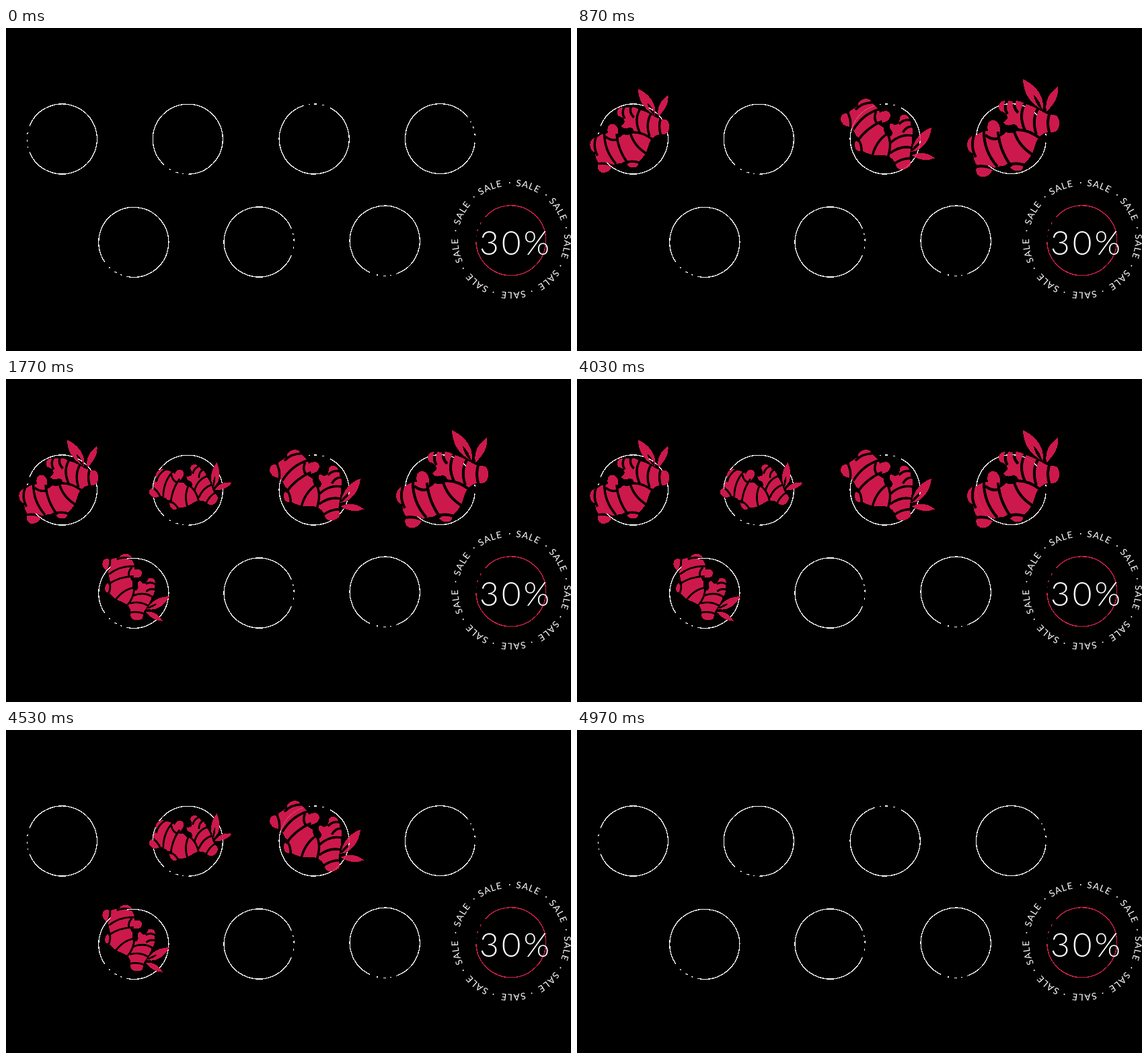
Write an HTML page that moves like this. It is 840x480 px and loops after 5010 ms.

```html
<!DOCTYPE html>
<html lang="en">
<head>
<meta charset="utf-8">
<title>Sale</title>
<style>
  html, body { margin: 0; width: 100%; height: 100%; overflow: hidden; background: #000; }
  svg { display: block; width: 840px; height: 480px; }
  text { fill: #fff; font-family: Lato, "Open Sans", sans-serif; }
  .ring { fill: none; stroke-width: 1.3; shape-rendering: crispEdges; stroke-dasharray: 316 8 2 7 4 9 3 11; }
  .word { font-size: 13.6px; letter-spacing: 1.2px; text-anchor: middle; }
  .percent { font-size: 49.5px; font-weight: 300; letter-spacing: 4px; }
</style>
</head>
<body>
<svg viewBox="0 0 840 480">
  <defs>
    <path id="arc" d="M672 313.5A79 79 0 0 1 830 313.5"/>
    <mask id="grooves" maskUnits="userSpaceOnUse" x="570" y="65" width="160" height="165">
      <path fill="#fff" d="M570 65h160v165h-160z"/>
      <g fill="none" stroke="#000" stroke-width="4.4">
        <path d="M703 125Q697 141 703 158M687 117Q675 135 683 158M668 109Q655 128 666 152"/>
        <path d="M652 104Q646 116 656 126M641 105Q633 116 640 128M648 152Q668 148 690 165"/>
        <path d="M649 150Q655 176 682 191M626 154Q628 182 646 206M605 152Q604 182 625 206"/>
        <path d="M591 157Q584 176 593 192M588 207Q606 202 622 211M638 205Q652 198 668 205M607 159Q618 168 629 163"/>
      </g>
    </mask>
    <g id="root" fill="#cd184b" shape-rendering="crispEdges">
      <path mask="url(#grooves)" d="M717 142Q717 130 709 129Q697 129 690 123Q678 116 665 112Q655 106 646 109
        Q638 106 630 110Q624 117 629 123Q640 126 640 134L634 141Q639 147 648 143Q656 143 656 152Q647 158 638 155
        Q632 160 628 162Q632 139 619 137Q608 138 611 153Q602 153 594 159Q580 161 580 174Q581 185 589 186
        Q589 196 595 205Q590 216 600 221Q614 223 619 208Q631 204 642 204Q647 214 659 212Q664 209 664 203
        Q678 190 681 174Q686 158 700 155Q717 157 717 142Z"/>
      <path d="M663 76Q684 86 691 104Q694 113 692 123Q689 108 679 100Q681 111 689 120Q664 105 663 76Z"/>
      <path d="M715 87Q717 107 698 124Q694 102 715 87Z"/>
    </g>
  </defs>
  <rect width="840" height="480"/>
  <g id="solid"></g>
  <g id="rings"></g>
  <g id="tint"></g>
  <g id="words"></g>
  <text class="percent" x="704" y="337">30%</text>
</svg>
<script>
const LOOP = 5010;
const byId = id => document.getElementById(id);

// centre x, centre y, direction of the broken part in degrees
const rings = [
  [83.3, 165, 180], [270.3, 165.2, 111], [458.2, 165, -85], [645.5, 164.6, -16],
  [189.8, 318.4, 124], [376.2, 318, 0], [563.2, 316.2, 93], [750.8, 315.8, 200]
];
byId("rings").innerHTML = rings.map(([x, y, gap], i) =>
  `<circle class="ring" cx="${x}" cy="${y}" r="52" pathLength="360"
    stroke="${i === 7 ? "#d2204c" : "#fff"}" transform="rotate(${gap + 22} ${x} ${y})"/>`).join("");

byId("words").innerHTML = Array.from({ length: 9 }, (_, i) =>
  `<g transform="rotate(${18 + 40 * i} 751 313.5)">
    <text class="word"><textPath href="#arc" startOffset="50%">SALE</textPath></text>
    <circle cx="751" cy="230" r="1" fill="#fff" transform="rotate(20.5 751 313.5)"/>
  </g>`).join("");

// head position, turn, size, then fade-in and fade-out spans in ms
const roots = [
  { x: 708, y: 141, turn: 0, size: 1, show: [20, 720], hide: [4000, 4510] },
  { x: 129.4, y: 146, turn: 0, size: .86, show: [20, 830], hide: [4010, 4560] },
  { x: 486, y: 202, turn: 72, size: .86, show: [440, 1240], hide: [4460, 4900] },
  { x: 307.5, y: 179, turn: 41, size: .7, show: [820, 1600], hide: [4520, 4950] },
  { x: 195, y: 352, turn: 94, size: .71, show: [820, 1770], hide: [4540, 5010] }
];
const rootMarkup = roots.map(({ x, y, turn, size }) =>
  `<g><use href="#root" transform="translate(${x} ${y}) rotate(${turn}) scale(${size}) translate(-708 -141)"/></g>`).join("");
const [solid, tint] = ["solid", "tint"].map(id => {
  byId(id).innerHTML = rootMarkup;
  return [...byId(id).children];
});

const progress = (t, [from, to]) => Math.min(1, Math.max(0, (t - from) / (to - from)));

// Against black a root is either full red or unseen; only the rings blend smoothly.
function draw(now) {
  const t = now % LOOP;
  roots.forEach(({ show, hide }, i) => {
    const shown = 1 - (1 - progress(t, show)) ** 2;
    const alpha = shown * (1 - progress(t, hide));
    const isSolid = alpha > .5;
    solid[i].style.opacity = isSolid ? 1 : 0;
    tint[i].style.opacity = alpha;
    tint[i].style.mixBlendMode = isSolid ? "normal" : "multiply";
  });
}

const start = performance.now();
function tick() {
  draw(performance.now() - start);
  requestAnimationFrame(tick);
}
tick();
</script>
</body>
</html>
```
